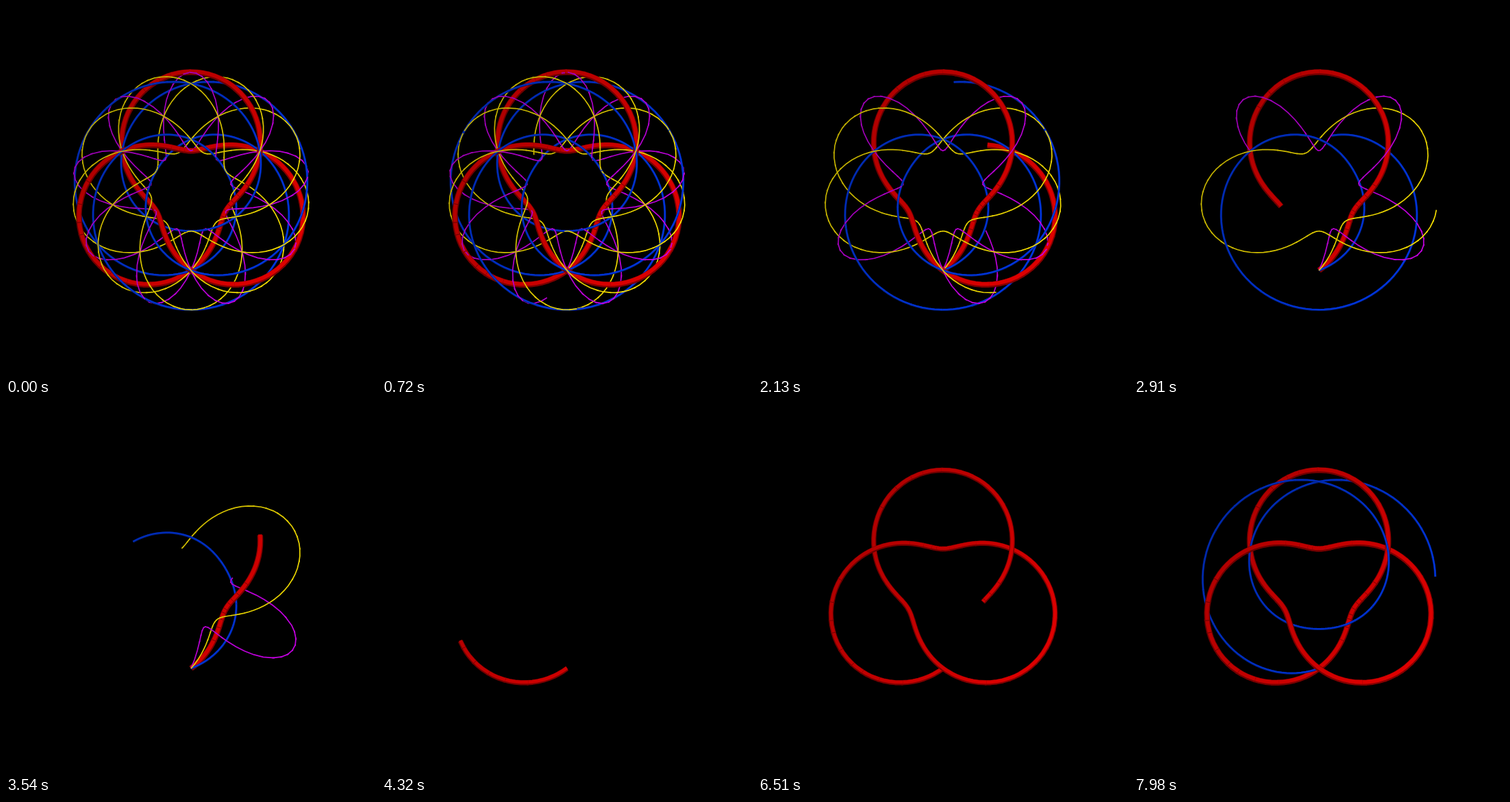
Animation of 540 by 540 pixels, one loop 8 s. Source, as an HTML page with a canvas:

```html
<!DOCTYPE html>
<html>
<head>
<meta charset="utf-8">
<style>
  html, body { margin: 0; width: 100%; height: 100%; overflow: hidden; background: #000; }
  canvas { display: block; width: 100vmin; height: 100vmin; }
</style>
</head>
<body>
<canvas width="540" height="540"></canvas>
<script>
const ctx = document.querySelector('canvas').getContext('2d');
const LOOP = 8000, STEP = 30, LAYERS = 10, TAU = 2 * Math.PI;
const CENTER = 270, RING = 116, TUBE = 57.5;

// Torus knots seen from above: turns around the ring, turns around the tube.
const knots = [
  { turns: 2, winds: 3, width: 7.5, rgb: [222, 0, 0] },
  { turns: 4, winds: 3, width: 3.2, rgb: [0, 54, 226] },
  { turns: 2, winds: 9, width: 1.7, rgb: [196, 0, 226] },
  { turns: 4, winds: 9, width: 1.7, rgb: [242, 220, 0] }
];

const clamp = v => Math.max(0, Math.min(1, v));
const shade = (rgb, k) => `rgb(${rgb.map(c => Math.round(c * k))})`;

// Light falls in from the lower right.
function lit(rgb, k) {
  const g = ctx.createLinearGradient(130, 180, 410, 360);
  g.addColorStop(0, shade(rgb, 0.78 * k));
  g.addColorStop(1, shade(rgb, k));
  return g;
}
for (const knot of knots) {
  knot.bright = lit(knot.rgb, 1);
  knot.dark = lit(knot.rgb, 0.6);
}

function point({ turns, winds }, u) {
  const angle = TAU * turns * u, r = RING + TUBE * Math.sin(TAU * winds * u);
  return [CENTER - r * Math.sin(angle), CENTER + r * Math.cos(angle)];
}

function layerOf(knot, u) {
  const z = -Math.cos(TAU * knot.winds * u);
  return Math.min(LAYERS - 1, Math.floor((z + 1) / 2 * LAYERS));
}

// One path per depth layer, for the stretch from..to of the knot.
function layerPaths(knot, from, to) {
  const paths = Array.from({ length: LAYERS }, () => new Path2D());
  const count = Math.ceil((to - from) * knot.turns * 120);
  const at = i => from + (to - from) * i / count;
  let last = -1;
  for (let i = 0; i < count; i++) {
    const layer = layerOf(knot, at(i + 0.5));
    if (layer !== last) paths[layer].moveTo(...point(knot, at(Math.max(0, i - 0.3))));
    paths[layer].lineTo(...point(knot, at(i + 1)));
    last = layer;
  }
  return paths;
}

// Erasing ends for all knots together; then they are drawn one after another.
function span(i, frame) {
  return frame < 136
    ? [clamp(1 - (134.35 - frame) / (92 + 10 * i)), 1]
    : [0, clamp((frame - 136 - 91 * i) / 90)];
}

function stroke(path, style, width, dy) {
  ctx.save();
  ctx.translate(0, dy);
  ctx.strokeStyle = style;
  ctx.lineWidth = width;
  ctx.stroke(path);
  ctx.restore();
}

function render(ms) {
  const frame = Math.floor(ms % LOOP / STEP);
  ctx.clearRect(0, 0, 540, 540);
  ctx.lineJoin = 'round';
  const visible = knots.map((knot, i) => {
    const [from, to] = span(i, frame);
    const full = frame < 136 || to === 1;
    return { knot, paths: layerPaths(knot, from, to), width: knot.width + (full && i === 0 ? 1 : 0) };
  });
  for (let layer = 0; layer < LAYERS; layer++) {
    for (const { knot, paths, width } of visible) {
      if (width < 2) {
        stroke(paths[layer], knot.bright, width, 0);
      } else {
        stroke(paths[layer], knot.dark, width, 0);
        stroke(paths[layer], knot.bright, width * 0.66, -width * 0.12);
      }
    }
  }
}

function tick(now) {
  render(now);
  requestAnimationFrame(tick);
}
requestAnimationFrame(tick);
</script>
</body>
</html>
```
